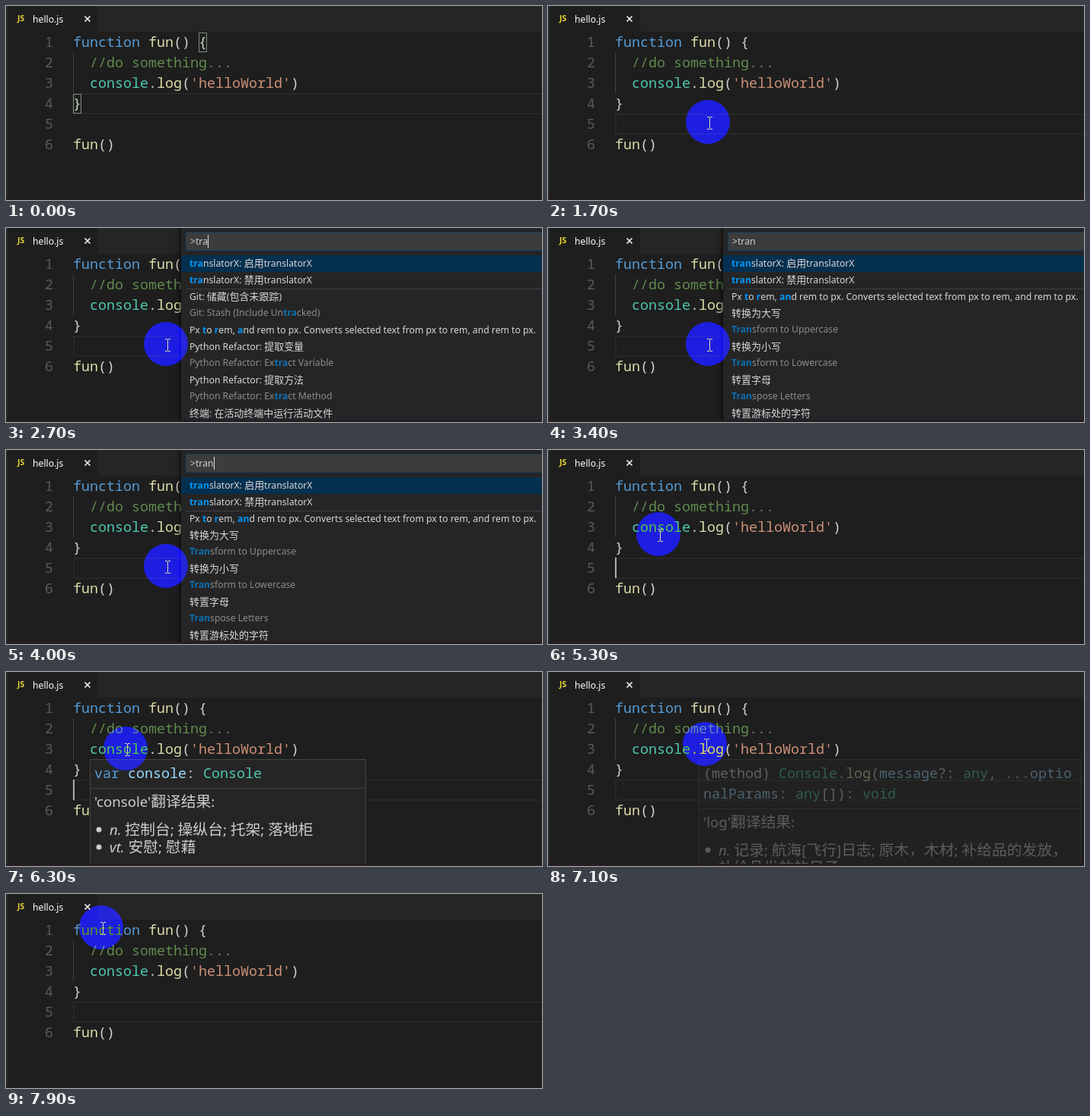
An HTML page with a canvas that plays this animation: 704x256 px, repeating every 8000 ms.

```html
<!DOCTYPE html>
<html lang="en">
<head>
<meta charset="utf-8">
<title>Editor demo</title>
<style>
  html, body { margin: 0; width: 100%; height: 100%; overflow: hidden; background: #1e1e1e; }
  canvas { display: block; }
</style>
</head>
<body>
<canvas id="stage" width="704" height="256"></canvas>
<script>
const ctx = document.getElementById('stage').getContext('2d');
const LOOP = 8000, STEP = 100;
const COL = 11, LINE = 27, LEFT = 88, TOP = 34;
const MONO = '500 18.333px "Noto Sans Mono", monospace';
const SANS = '"Noto Sans", "Open Sans", "Noto Sans CJK SC", "Noto Sans CJK", sans-serif';
const CJK = '"Noto Sans CJK SC", "Noto Sans CJK", sans-serif';
const C = {
  bg: '#1e1e1e', panel: '#252526', plain: '#d4d4d4', keyword: '#569cd6', func: '#dcdcaa',
  comment: '#608b4e', type: '#4ec9b0', string: '#ce9178', param: '#9cdcfe',
  match: '#0097fb', dimMatch: '#0b70b4', label: '#d8d8d8', dimLabel: '#8c8c8c'
};

const CODE = [
  [['function ', C.keyword], ['fun', C.func], ['() {', C.plain]],
  [['  //do something...', C.comment]],
  [['  console', C.type], ['.', C.plain], ['log', C.func], ['(', C.plain], ["'helloWorld'", C.string], [')', C.plain]],
  [['}', C.plain]],
  [],
  [['fun', C.func], ['()', C.plain]]
];

// Each entry is a label with an optional second line.
const COMMON = [['translatorX: 启用translatorX'], ['translatorX: 禁用translatorX']];
const PX = ['Px to rem, and rem to px. Converts selected text from px to rem, and rem to px.'];
const WIDE_LIST = [...COMMON,
  ['Git: 储藏(包含未跟踪)', 'Git: Stash (Include Untracked)'],
  PX,
  ['Python Refactor: 提取变量', 'Python Refactor: Extract Variable'],
  ['Python Refactor: 提取方法', 'Python Refactor: Extract Method'],
  ['终端: 在活动终端中运行活动文件']
];
const NARROW_LIST = [...COMMON, PX,
  ['转换为大写', 'Transform to Uppercase'],
  ['转换为小写', 'Transform to Lowercase'],
  ['转置字母', 'Transpose Letters'],
  ['转置游标处的字符']
];

const HOVERS = [
  {
    from: 5630, to: 6500, x: 110, w: 363,
    code: [[['var ', C.keyword], ['console', C.param], [': ', C.plain], ['Console', C.type]]],
    title: "'console'翻译结果:",
    items: [['n.', '控制台; 操纵台; 托架; 落地柜'], ['vt.', '安慰; 慰藉']]
  },
  {
    from: 7030, to: 7500, x: 198, w: 502,
    code: [
      [['(method) ', C.plain], ['Console', C.type], ['.', C.plain], ['log', C.func], ['(', C.plain],
       ['message', C.param], ['?: ', C.plain], ['any', C.type], [', ...', C.plain], ['optio', C.param]],
      [['nalParams', C.param], [': ', C.plain], ['any', C.type], ['[]): ', C.plain], ['void', C.type]]
    ],
    title: "'log'翻译结果:",
    items: [['n.', '记录; 航海[飞行]日志; 原木，木材; 补给品的发放，'], ['', '补给品发放的日子']]
  }
];

// Pointer keys: time, x, y.
const PATH = [
  [100, 212, 154], [4900, 212, 154], [5300, 147, 112], [5500, 145, 104],
  [6100, 145, 104], [7000, 208, 96], [7300, 208, 96], [7900, 127, 45]
];

function rect(x, y, w, h, color) {
  ctx.fillStyle = color;
  ctx.fillRect(x, y, w, h);
}

function outline(x, y, w, h, color, width = 1) {
  ctx.strokeStyle = color;
  ctx.lineWidth = width;
  ctx.strokeRect(x + width / 2, y + width / 2, w - width, h - width);
}

function mono(runs, x, y) {
  ctx.font = MONO;
  for (const [text, color] of runs) {
    ctx.fillStyle = color;
    ctx.fillText(text, x, y);
    x += text.length * COL;
  }
}

// Draws mixed Latin and Chinese text and returns its right edge.
function sans(text, x, y, color, size = 12.2, style = '') {
  ctx.fillStyle = color;
  for (const part of text.match(/[\u3000-\uffef]+|[^\u3000-\uffef]+/g) || []) {
    const wide = part.charCodeAt(0) >= 0x3000;
    ctx.font = `${style} ${wide ? size * 1.065 : size}px ${wide ? CJK : SANS}`;
    ctx.fillText(part, x, y);
    x += ctx.measureText(part).width;
  }
  return x;
}

// Whole substring first, otherwise letters that start words or follow a match.
function matches(label, query) {
  const text = label.toLowerCase(), at = text.indexOf(query);
  if (at >= 0) return [...query].map((_, i) => at + i);
  const found = [];
  for (let i = 0; i < text.length && found.length < query.length; i++) {
    const linked = text[i - 1] === ' ' || (found.length && found[found.length - 1] === i - 1);
    if (linked && text[i] === query[found.length]) found.push(i);
  }
  return found.length === query.length ? found : [];
}

function label(text, query, x, y, color, matchColor) {
  const hits = new Set(matches(text, query));
  for (let i = 0; i < text.length;) {
    let end = i + 1;
    while (end < text.length && hits.has(end) === hits.has(i)) end++;
    const hit = hits.has(i);
    x = sans(text.slice(i, end), x, y, hit ? matchColor : color, 12.2, hit ? 'bold' : '');
    i = end;
  }
}

function drawTabs() {
  rect(0, 0, 704, 256, C.bg);
  rect(121, 0, 583, TOP, C.panel);
  rect(0, 0, 2, 256, '#2b2b2c');
  ctx.font = 'bold 10.5px "Open Sans", sans-serif';
  ctx.fillStyle = '#e6d32e';
  ctx.fillText('JS', 15, 20);
  sans('hello.js', 35, 22, '#ffffff');
  ctx.strokeStyle = '#f0f0f0';
  ctx.lineWidth = 1.7;
  ctx.beginPath();
  ctx.moveTo(103.5, 13.5); ctx.lineTo(110.5, 20.5);
  ctx.moveTo(110.5, 13.5); ctx.lineTo(103.5, 20.5);
  ctx.stroke();
}

function drawEditor(t) {
  const clicked = t >= 200;
  const lineTop = TOP + LINE * (clicked ? 4 : 3);
  outline(LEFT, lineTop, 630, LINE + 1, '#282828', 2);
  rect(LEFT, 61, 1, 54, '#404040');
  if (!clicked) {
    for (const [x, y] of [[253, 35], [88, 116]]) {
      rect(x, y, 11, 26, 'rgba(0,100,0,.1)');
      outline(x, y, 11, 26, '#888');
    }
  }
  CODE.forEach((runs, i) => {
    const y = 54 + LINE * i;
    mono([[String(i + 1), '#5a5a5a']], 51, y);
    mono(runs, LEFT, y);
  });
  const since = t < 1800 ? t - 200 : t - 4200;
  if (since >= 0 && blinkOn(since)) rect(LEFT, 142, 2, 27, '#aeafad');
}

const blinkOn = ms => Math.floor(ms / 500) % 2 === 0;

function drawPalette(t) {
  if (t < 1800 || t >= 4200) return;
  const keys = [2500, 2600, 2700, 2900];
  const typed = keys.filter(k => t >= k);
  const query = 'tran'.slice(0, typed.length);
  const list = query.length < 4 ? WIDE_LIST : NARROW_LIST;
  const selected = t >= 3600 && t < 3900 ? 1 : 0;

  ctx.save();
  ctx.shadowColor = '#000';
  ctx.shadowBlur = 8;
  rect(230, -10, 490, 280, C.panel);
  ctx.restore();
  rect(236, 5, 480, 25, '#3c3c3c');
  outline(236, 5, 480, 25, '#0f3f5e');
  const end = sans('>' + query, 242, 22, '#d0d0d0');
  if (blinkOn(t - (typed.pop() || 1800))) rect(Math.round(end), 9, 1, 17, '#e0e0e0');

  let y = 36;
  list.forEach(([main, sub], i) => {
    if (i === selected) rect(230, y, 474, 22, '#05304f');
    if (i === 2) rect(236, y, 468, 1, '#3f3f46');
    label(main, query, 241, y + 15, C.label, C.match);
    if (sub) label(sub, query, 241, y + 36, C.dimLabel, C.dimMatch);
    y += sub ? 44 : 22;
  });
}

function drawHover(h, t) {
  if (t < h.from || t >= h.to) return;
  const textX = h.x + 6, size = 18.6;
  ctx.save();
  ctx.globalAlpha = Math.min(1, (t - h.from) / 200);
  rect(h.x, 115, h.w, 150, C.panel);
  outline(h.x, 115, h.w, 150, '#454545');
  h.code.forEach((runs, i) => mono(runs, textX, 140 + LINE * i));
  let y = 126 + LINE * h.code.length;
  rect(h.x + 1, y, h.w - 2, 1, '#454545');
  sans(h.title, textX, y += 25, '#cccccc', size);
  y += 37;
  for (const [kind, text] of h.items) {
    let x = textX + 20;
    if (kind) {
      ctx.fillStyle = '#cccccc';
      ctx.beginPath();
      ctx.arc(textX + 6, y - 7, 3.5, 0, 7);
      ctx.fill();
      x = sans(kind + ' ', x, y, '#cccccc', size, 'italic');
    }
    sans(text, x, y, '#cccccc', size);
    y += 23;
  }
  ctx.restore();
}

function drawPointer(t) {
  if (t < PATH[0][0]) return;
  let [, x, y] = PATH[PATH.length - 1];
  const next = PATH.findIndex(key => key[0] > t);
  if (next > 0) {
    const [t0, x0, y0] = PATH[next - 1], [t1, x1, y1] = PATH[next];
    const k = (t - t0) / (t1 - t0);
    x = Math.round(x0 + (x1 - x0) * k);
    y = Math.round(y0 + (y1 - y0) * k);
  }
  // The halo inverts the blue channel of whatever lies under it.
  ctx.save();
  ctx.globalCompositeOperation = 'difference';
  ctx.fillStyle = '#00f';
  ctx.beginPath();
  ctx.arc(x - 2, y - 1, 29, 0, 7);
  ctx.fill();
  ctx.restore();
  const ink = '#e0e0a8';
  rect(x, y - 7, 1, 15, ink);
  for (const end of [y - 8, y + 8]) {
    rect(x - 3, end, 3, 1, ink);
    rect(x + 1, end, 3, 1, ink);
  }
}

function frame(now) {
  const t = Math.floor((now % LOOP) / STEP) * STEP;
  drawTabs();
  drawEditor(t);
  drawPalette(t);
  HOVERS.forEach(h => drawHover(h, t));
  rect(0, 253, 704, 3, '#241d21');
  drawPointer(t);
}

let start;
function tick(now) {
  start ??= now;
  frame(Math.max(0, now - start));
  requestAnimationFrame(tick);
}
frame(0);
requestAnimationFrame(tick);
</script>
</body>
</html>
```
